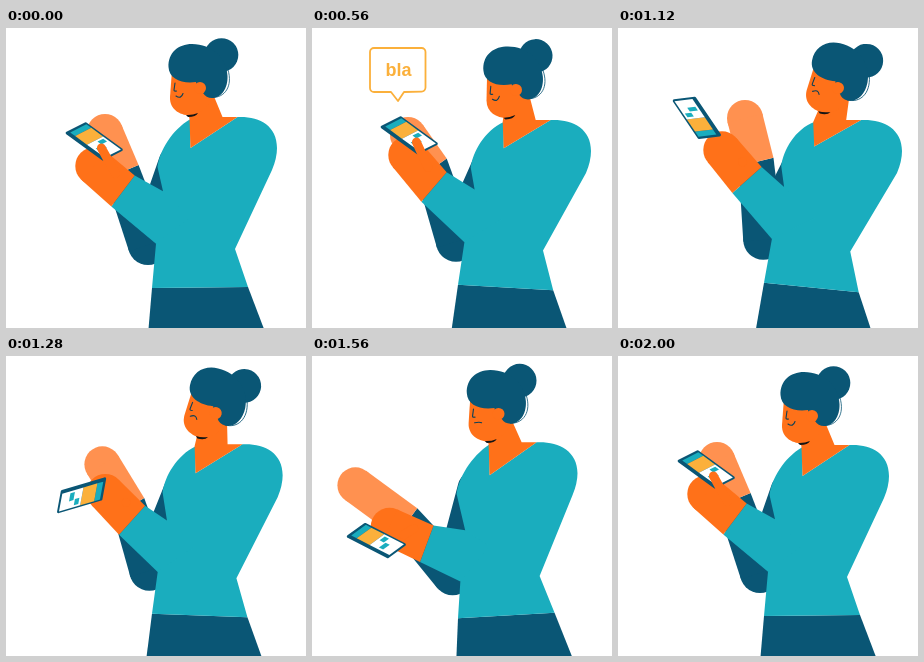
An HTML page with a canvas that plays this animation: 300x300 px, repeating every 2040 ms.

```html
<!DOCTYPE html>
<html lang="en">
<head>
<meta charset="utf-8">
<title>Texting</title>
<style>
html, body { margin: 0; width: 100%; height: 100%; overflow: hidden; background: #fff; }
canvas { display: block; width: 100vw; height: 100vh; }
</style>
</head>
<body>
<canvas id="stage"></canvas>
<script>
const canvas = document.getElementById('stage');
const ctx = canvas.getContext('2d');
const TEAL = '#1aadbe', DARK = '#0a5675', SKIN = '#ff7119', PALE = '#ff9150', GOLD = '#fbb03b', LINE = '#0d4058';
const LOOP = 2040, STEP = 40;
const ratio = Math.max(1, window.devicePixelRatio || 1);
canvas.width = canvas.height = 300 * ratio;

// time, sway, shoulder y, head x/y/tilt, near hand, near wrist, far hand, far wrist, phone x/y/angle, mood
const keys = [
  [0,     0, 89,   0,  0,   0,   88, 138, 117, 163,   99, 104, 116, 144,   89, 113,  36,  1],
  [280,   4, 87,   5, -6,   0,   91, 130, 119, 160,   97, 103, 118, 141,   94, 107,  34,  1],
  [560,   8, 92,  10,  2,  -3,   95, 127, 122, 159,   96, 107, 120, 141,   98, 107,  36,  1],
  [840,  11, 94,  12,  3,  -5,   93, 134, 125, 157,  106, 107, 124, 140,  101, 104,  44,  1],
  [1120, 13, 92,  26,  0,  13,  104, 122, 129, 152,  127,  90, 138, 134,   78,  90, 236, -1],
  [1440, -3, 85,   1, -5,   9,   90, 157, 121, 180,   58, 130, 103, 170,   74, 193,  54, -1],
  [1600, -6, 87, -10, -1,  -4,   74, 175, 113, 190,   42, 129,  93, 165,   63, 178,  22,  0],
  [1720, -7, 89, -16,  1, -12,   72, 188, 111, 195,   55, 136,  94, 163,   67, 164,  11,  1]
];
const CYCLE = 2000;

function keyAt(i) {
  const n = keys.length, k = keys[(i + n) % n];
  return { k, t: k[0] + Math.floor(i / n) * CYCLE };
}

// Smooth curve through the poses
function poseAt(t) {
  t = Math.min(t, CYCLE);
  let i = keys.length - 1;
  while (i > 0 && keys[i][0] > t) i--;
  const [a, b, c, d] = [-1, 0, 1, 2].map(o => keyAt(i + o));
  const h = c.t - b.t, u = (t - b.t) / h, u2 = u * u, u3 = u2 * u;
  return b.k.map((p, j) => {
    const q = c.k[j];
    const m0 = (q - a.k[j]) / (c.t - a.t) * h;
    const m1 = (d.k[j] - p) / (d.t - b.t) * h;
    return (2 * u3 - 3 * u2 + 1) * p + (u3 - 2 * u2 + u) * m0 + (3 * u2 - 2 * u3) * q + (u3 - u2) * m1;
  });
}

const clamp = (x, lo = 0, hi = 1) => Math.max(lo, Math.min(hi, x));
const ramp = (t, from, to) => clamp((t - from) / (to - from));
const mix = (a, b, u) => [a[0] + (b[0] - a[0]) * u, a[1] + (b[1] - a[1]) * u];

function poly(color, ...pts) {
  ctx.fillStyle = color;
  ctx.beginPath();
  pts.forEach(p => ctx.lineTo(p[0], p[1]));
  ctx.closePath();
  ctx.fill();
}
function disc(color, x, y, r) {
  ctx.fillStyle = color;
  ctx.beginPath();
  ctx.arc(x, y, r, 0, 7);
  ctx.fill();
}
function limb(color, a, b, width) {
  ctx.strokeStyle = color;
  ctx.lineWidth = width;
  ctx.lineCap = 'round';
  ctx.beginPath();
  ctx.moveTo(a[0], a[1]);
  ctx.lineTo(b[0], b[1]);
  ctx.stroke();
}
// Two points either side of b, square to the line from a to b
function sides(a, b, r) {
  const dx = b[0] - a[0], dy = b[1] - a[1], l = Math.hypot(dx, dy) || 1;
  const nx = dy / l * r, ny = -dx / l * r;
  return [[b[0] + nx, b[1] + ny], [b[0] - nx, b[1] - ny]];
}
function hand(color, tip, wrist, r, w1, w2) {
  const [p2, p1] = sides(wrist, tip, r);
  disc(color, tip[0], tip[1], r);
  poly(color, p1, w1, w2, p2);
}

function farArm(s, neckX, v, tip, wrist) {
  const elbow = [142 + .25 * s, 217 - .4 * s];
  const [w1, w2] = sides(tip, wrist, 18);
  const [e1, e2] = sides(wrist, elbow, 20);
  limb(DARK, elbow, [neckX - 14, v + 46], 36);
  disc(DARK, elbow[0], elbow[1], 20);
  poly(DARK, w1, e1, e2, w2);
  hand(PALE, tip, wrist, 18, w1, w2);
}

function skirt(s) {
  poly(DARK, [146, 260 - .4 * s], [242 - .1 * s, 259 + .4 * s],
    [258 - .4 * s, 301], [142.5 - .35 * s, 301]);
}

const veeOf = (s, neckX, v) => [neckX, v + 31 - .35 * s];

function shirt(s, neckX, v, w1, w2) {
  const right = 271 + s, left = v - .3 * s;
  const fold = [157 + .7 * s, 163 + .5 * (w1[1] - 147)];
  const elbow = [150 + .3 * s, 216 + .35 * (w2[1] - 179)];
  ctx.fillStyle = TEAL;
  ctx.beginPath();
  ctx.moveTo(...veeOf(s, neckX, v));
  ctx.lineTo(neckX + 47, v);
  ctx.bezierCurveTo(neckX + 68, v - 1, right, v + 8, right, v + 31);
  ctx.quadraticCurveTo(right, v + 41, right - 5, v + 53);
  ctx.lineTo(229 + .25 * s, 221 + .2 * s);
  ctx.lineTo(242 - .1 * s, 259 + .4 * s);
  ctx.lineTo(146, 260 - .4 * s);
  ctx.lineTo(...elbow);
  ctx.lineTo(...fold);
  ctx.lineTo(neckX - 33, left + 50);
  ctx.bezierCurveTo(neckX - 31, left + 34, neckX - 19, left + 13, neckX, v + 2);
  ctx.closePath();
  ctx.fill();
  poly(TEAL, w1, fold, [neckX, 190], elbow, w2);
}

// The head turns about the ear
const EAR = [194, 60];
function headPoint(hx, hy, tilt, x, y) {
  const a = tilt * Math.PI / 180, c = Math.cos(a), n = Math.sin(a);
  x -= EAR[0];
  y -= EAR[1];
  return [EAR[0] + hx + x * c - y * n, EAR[1] + hy + x * n + y * c];
}
function inHead(hx, hy, tilt, draw) {
  ctx.save();
  ctx.translate(EAR[0] + hx, EAR[1] + hy);
  ctx.rotate(tilt * Math.PI / 180);
  ctx.translate(-EAR[0], -EAR[1]);
  draw();
  ctx.restore();
}

function head(mood) {
  disc(DARK, 215.5, 27, 16.8);
  ctx.fillStyle = SKIN;
  ctx.beginPath();
  ctx.moveTo(166, 42);
  ctx.lineTo(164, 69);
  ctx.bezierCurveTo(163.5, 81, 173, 87, 184, 87.5);
  ctx.quadraticCurveTo(202, 84, 208, 66);
  ctx.lineTo(207, 42);
  ctx.fill();

  ctx.fillStyle = DARK;
  ctx.beginPath();
  ctx.moveTo(190, 54);
  ctx.bezierCurveTo(176, 56, 163, 51, 162.5, 39);
  ctx.bezierCurveTo(162, 25, 172, 16, 186, 16);
  ctx.bezierCurveTo(206, 16, 221, 30, 221.5, 48);
  ctx.bezierCurveTo(222, 61, 215, 70, 206, 70);
  ctx.quadraticCurveTo(200, 70, 197, 65);
  ctx.lineTo(191, 60);
  ctx.closePath();
  ctx.fill();
  disc(SKIN, EAR[0], EAR[1], 6);

  ctx.lineCap = 'round';
  ctx.strokeStyle = DARK;
  ctx.lineWidth = .8;
  ctx.beginPath();
  ctx.moveTo(222, 42);
  ctx.bezierCurveTo(227, 58, 219, 70, 206, 69.5);
  ctx.stroke();

  ctx.strokeStyle = LINE;
  ctx.lineWidth = 1.1;
  ctx.beginPath();
  ctx.moveTo(169, 55);
  ctx.lineTo(168, 62);
  ctx.quadraticCurveTo(168, 63.5, 170.5, 63);
  ctx.stroke();
  ctx.beginPath();
  ctx.moveTo(170, 68.5 - mood * .5);
  ctx.quadraticCurveTo(175, 68.5 + mood * 3, 177, 68 - mood * 2.5);
  ctx.stroke();

  ctx.fillStyle = '#151515';
  ctx.beginPath();
  ctx.moveTo(180, 87);
  ctx.quadraticCurveTo(186, 87.5, 192, 85);
  ctx.quadraticCurveTo(190, 89, 182, 89);
  ctx.fill();
}

function neck(s, neckX, v, hx, hy, tilt) {
  const at = (x, y) => headPoint(hx, hy, tilt, x, y);
  poly(SKIN, at(181, 80), [neckX - 1, v + 2], veeOf(s, neckX, v),
    [neckX + 47, v], [neckX + 32, v], at(207, 66));
}

function phone(x, y, angle) {
  const a = angle * Math.PI / 180, b = a - 63 * Math.PI / 180;
  const u = [47 * Math.cos(a), 47 * Math.sin(a)], w = [21.5 * Math.cos(b), 21.5 * Math.sin(b)];
  const at = (p, q) => [x + u[0] * (p - .5) + w[0] * (q - .5), y + u[1] * (p - .5) + w[1] * (q - .5)];
  const box = (color, p, q, l, h) => poly(color, at(p, q), at(p + l, q), at(p + l, q + h), at(p, q + h));
  ctx.strokeStyle = DARK;
  ctx.lineWidth = 3;
  ctx.lineJoin = 'round';
  box(DARK, .03, -.02, .94, .96);
  ctx.stroke();
  box(TEAL, .05, .1, .13, .84);
  box(GOLD, .18, .1, .31, .84);
  box('#fff', .49, .1, .47, .84);
  box(TEAL, .54, .55, .1, .3);
  box(TEAL, .67, .2, .1, .38);
  return at(.72, .4);
}

function bubble(t) {
  const size = ramp(t, 220, 360) * (1 - ramp(t, 950, 1070));
  if (size <= 0) return;
  ctx.save();
  ctx.translate(86, 73);
  ctx.scale(size, size);
  ctx.translate(-86, -73);
  ctx.strokeStyle = GOLD;
  ctx.fillStyle = '#fff';
  ctx.lineWidth = 1.8;
  ctx.lineJoin = 'round';
  ctx.beginPath();
  ctx.moveTo(79, 64);
  ctx.lineTo(86, 73);
  ctx.lineTo(92, 64);
  ctx.arcTo(113.5, 63.5, 113.5, 20, 4);
  ctx.arcTo(113.5, 20, 58, 20, 4);
  ctx.arcTo(58, 20, 58, 64, 4);
  ctx.arcTo(58, 64, 79, 64, 4);
  ctx.closePath();
  ctx.fill();
  ctx.stroke();
  ctx.fillStyle = GOLD;
  ctx.font = 'bold 18px "Liberation Sans", Arial, sans-serif';
  ctx.textAlign = 'center';
  [['b', 79], ['l', 87], ['a', 94.5]].forEach(([letter, x], i) => {
    const k = ramp(t, 340 + i * 60, 420 + i * 60) * (1 - ramp(t, 890 - i * 50, 970 - i * 50));
    if (k <= 0) return;
    ctx.save();
    ctx.translate(x, 48);
    ctx.scale(k, k);
    ctx.fillText(letter, 0, 0);
    ctx.restore();
  });
  ctx.restore();
}

function draw(t) {
  const [, s, v, hx, hy, tilt, nx, ny, wx, wy, fx, fy, gx, gy, px, py, angle, rawMood] = poseAt(t);
  const mood = clamp(rawMood, -1, 1);
  const neckX = 184.5 + s * (s < 0 ? 1.25 : .9);
  const near = [nx, ny], wrist = [wx, wy];
  const bend = [153 + .4 * s, 190 + .45 * (wy - 163)];
  const [w2, w1] = sides(bend, wrist, 19.5);

  ctx.setTransform(ratio, 0, 0, ratio, 0, 0);
  ctx.fillStyle = '#fff';
  ctx.fillRect(0, 0, 300, 300);

  farArm(s, neckX, v, [fx, fy], [gx, gy]);
  skirt(s);
  shirt(s, neckX, v, w1, w2);
  neck(s, neckX, v, hx, hy, tilt);
  inHead(hx, hy, tilt, () => head(mood));

  hand(SKIN, near, wrist, 18.7, w1, w2);
  const touch = phone(px, py, angle);
  const grip = clamp((mood + 1) / 2);
  const base = mix(mix(near, w1, .5), wrist, .15);
  limb(SKIN, base, mix(base, touch, grip), 9);
  bubble(t);
}

function tick(now) {
  draw(Math.floor(now % LOOP / STEP) * STEP);
  requestAnimationFrame(tick);
}
draw(0);
requestAnimationFrame(tick);
</script>
</body>
</html>
```
